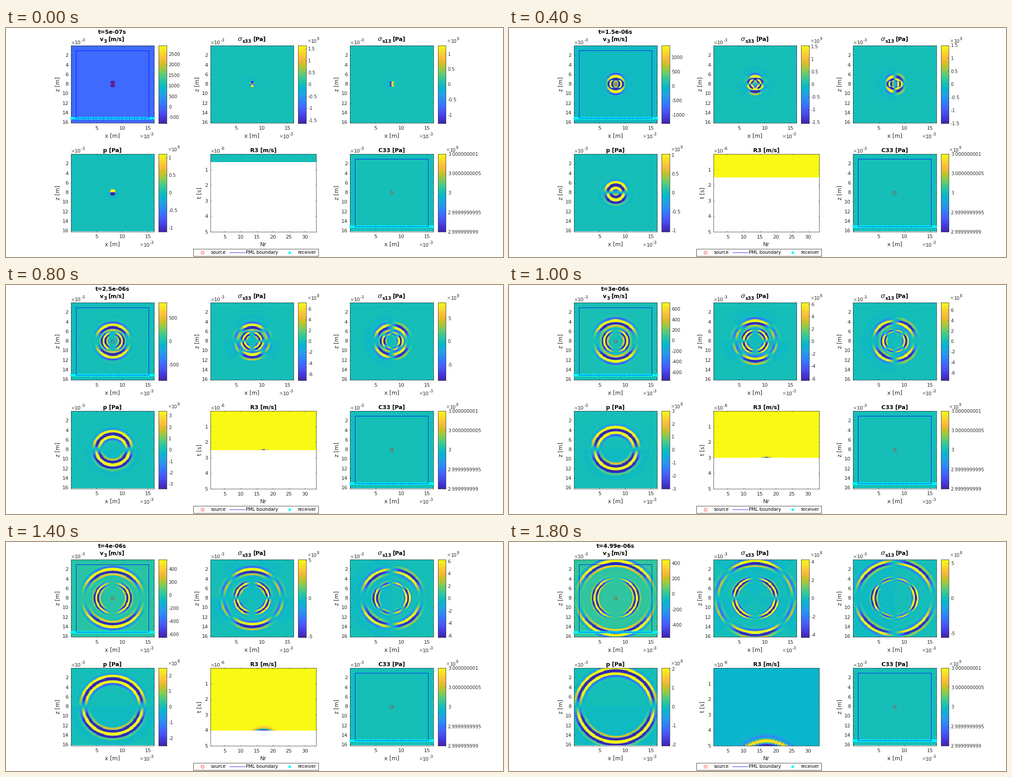
A matplotlib script that plays this animation: 1101x509 px, repeating every 2 s.

```python
import numpy as np
import matplotlib.pyplot as plt
from matplotlib.animation import FuncAnimation
from matplotlib.colors import LinearSegmentedColormap
from matplotlib.patches import Rectangle

W, H, PT = 1101, 509, 0.72            # stage in pixels, points per pixel
TICK, LABEL, SMALL = 11.1, 12.35, 10.1
GREY = "#262626"
SIZE, MID = 16.2, 8.1                 # model width and centre, mm

plt.rcParams["font.family"] = "DejaVu Sans"
parula = LinearSegmentedColormap.from_list("parula", list(zip(
    np.append(np.arange(0, 61, 4), 63) / 63, [
        (.2422, .1504, .6603), (.2706, .2147, .8364), (.2813, .3006, .9414),
        (.2699, .3892, .9906), (.1963, .4847, .9892), (.1687, .5703, .9359),
        (.1248, .6459, .8883), (.0297, .7082, .8163), (.0964, .7500, .7120),
        (.2161, .7843, .5923), (.3909, .8029, .4354), (.6174, .7876, .2612),
        (.8203, .7498, .1535), (.9728, .7298, .2394), (.9892, .8136, .1885),
        (.9597, .9135, .1423), (.9769, .9839, .0805)])), N=256)

TIMES = [.5, 1, 1.5, 2, 2.5, 3, 3.5, 4, 4.5, 4.99]     # microseconds
V_LOW = [-790, -1740, -1290, -937, -832, -755, -695, -645, -603, -563]
V_HIGH = [2915, 1820, 1410, 1028, 832, 725, 619, 550, 495, 447]
PEAK = {                                               # in 1e8 Pa
    "s33": [16.4, 28.1, 15.5, 8.6, 7.18, 6.3, 5.6, 5.1, 4.6, 4.28],
    "s13": [12.85, 22, 15, 10.2, 8.4, 7.5, 6.78, 6.3, 5.9, 5.55],
    "p": [11.1, 23.6, 10.3, 4.04, 3.42, 3.005, 2.7, 2.49, 2.29, 2.07],
}

fig = plt.figure(figsize=(W / 100, H / 100), dpi=100, facecolor="white")


def text(x, y, s, size=LABEL, ha="left", color="black", **kw):
    """Text with its capitals centred on pixel row y."""
    return fig.text(x / W, 1 - (y + .365 * size) / H, s, fontsize=size * PT,
                    ha=ha, va="baseline", color=color, **kw)


def bold(x, y, s, size=LABEL, ha="left"):
    return text(x, y, s, size, ha, weight="bold")


def power(x, y, exp, size=TICK):
    """Axis multiplier; returns the exponent so it can change."""
    text(x, y, "×", size, color="0.4")
    text(x + .838 * size, y, "10", size, color=GREY)
    return text(x + 2.11 * size, y - .47 * size, str(exp), .8 * size, color=GREY)


def make_axes(x0, y0, x1, y1):
    ax = fig.add_axes([x0 / W, 1 - y1 / H, (x1 - x0) / W, (y1 - y0) / H])
    for side in ax.spines.values():
        side.set(linewidth=.55, color=GREY)
    ax.tick_params(direction="in", length=1.4, width=.5, color=GREY,
                   labelcolor=GREY, labelsize=TICK * PT, top=True, right=True)
    ax.tick_params(axis="x", pad=5)
    ax.tick_params(axis="y", pad=3.6)
    return ax


def label_axes(x0, y0, x1, y1, xlabel, ylabel, ygap, exp):
    mid = (x0 + x1) / 2
    text(mid, y1 + 27.5, xlabel, ha="center", color=GREY)
    fig.text((x0 - ygap) / W, 1 - (y0 + y1) / 2 / H, ylabel, rotation=90,
             fontsize=LABEL * PT, ha="center", va="center", color=GREY)
    power(x0 - .5, y0 - 7, exp)


def map_panel(x0, y0):
    x1, y1 = x0 + 184.5, y0 + 172.5
    ax = make_axes(x0, y0, x1, y1)
    im = ax.imshow(np.zeros((162, 162)), cmap=parula, vmin=-1, vmax=1,
                   extent=(0, SIZE, SIZE, 0), aspect="auto",
                   interpolation="nearest")
    ax.set_xticks([5, 10, 15])
    ax.set_yticks(range(2, 17, 2))
    label_axes(x0, y0, x1, y1, "x [m]", "z [m]", 29, -3)
    power(x1 - 32.5, y1 + 29, -3)
    return ax, im


def color_bar(x0, y0):
    ax = make_axes(x0, y0 - .5, x0 + 17.5, y0 + 173)
    ax.set_xticks([])
    im = ax.imshow(np.linspace(0, 1, 256)[:, None], cmap=parula, origin="lower",
                   extent=(0, 1, 0, 1), aspect="auto")
    ax.yaxis.tick_right()
    ax.tick_params(axis="y", labelsize=SMALL * PT, pad=3.4)
    return ax, im


def scale_bar(bar, low, high, step):
    ax, im = bar
    im.set_extent((0, 1, low, high))
    n = np.arange(int(np.ceil(low / step)), int(np.floor(high / step)) + 1)
    ax.set_yticks(n * step, [f"{v:g}" for v in n * step])
    ax.set_ylim(low, high)


def geometry(ax):
    ax.plot(np.linspace(.1, 16.1, 33), np.full(33, 15.1), "o", color="cyan",
            ms=6 * PT, mew=0, clip_on=False, zorder=3)
    ax.add_patch(Rectangle((1, 1), 14.15, 14.1, fill=False, ec="blue", lw=.6,
                           zorder=4))
    ax.plot(MID, MID, "o", mfc="none", mec="red", ms=6.6 * PT, mew=.55, zorder=5)
    ax.set_xlim(0, SIZE)
    ax.set_ylim(SIZE, 0)


# Panels
TOP, LOW = 39, 280
COLS = [143.5, 452.5, 762]
PLACE = {"v3": (COLS[0], TOP), "s33": (COLS[1], TOP),
         "s13": (COLS[2], TOP), "p": (COLS[0], LOW)}
images, bars, exps = {}, {}, {}
for key, (px, py) in PLACE.items():
    panel, images[key] = map_panel(px, py)
    bars[key] = color_bar(px + 194.5, py)
    if key == "v3":
        geometry(panel)
    else:
        exps[key] = power(px + 215, py - 10, 9, SMALL)

stiff, _ = map_panel(COLS[2], LOW)
geometry(stiff)
stiff_bar = color_bar(COLS[2] + 194.5, LOW)
scale_bar(stiff_bar, -2, 2, 1)
stiff_bar[0].set_yticks(range(-2, 3), [
    "2.999999999", "2.9999999995", "3", "3.0000000005", "3.000000001"])
power(COLS[2] + 213, LOW - 9, 9, SMALL)

REC = (COLS[1], LOW, 687, LOW + 173)
rec = make_axes(*REC)
rec_im = rec.imshow(np.zeros((500, 33)), cmap=parula, vmin=0, vmax=1,
                    extent=(.5, 33.5, 5, 0), aspect="auto",
                    interpolation="nearest")
rec.set_xticks(range(5, 31, 5))
rec.set_yticks(range(1, 6))
label_axes(*REC, "Nr", "t [s]", 23.5, -6)

# Titles
clock = bold(235.5, 8.5, "", ha="center")
bold(208, 24, "v")
bold(216, 29.5, "3", 10.3)
bold(227, 24, "[m/s]")
for left, sub in ((514, "s33"), (823.5, "s13")):
    text(left, 24, "σ", 13.5, family="DejaVu Serif", style="italic")
    bold(left + 9.5, 29.5, sub, 10.3)
    bold(left + 33.5, 24, "[Pa]")
bold(235.8, 271, "p [Pa]", ha="center")
bold(569.8, 271, "R3 [m/s]", ha="center")
bold(854.5, 271, "C33 [Pa]", ha="center")

# Legend
over = fig.add_axes([0, 0, 1, 1])
over.set(xlim=(0, W), ylim=(H, 0))
over.axis("off")
over.add_patch(Rectangle((414.5, 490.5), 277.5, 16, fc="white", ec=GREY, lw=.6))
over.plot(435, 498.5, "o", mfc="none", mec="red", ms=6.6 * PT, mew=.55)
over.plot([494.5, 528.5], [498.5, 498.5], color="blue", lw=.6)
over.plot(627.5, 498.5, "o", color="cyan", ms=6 * PT, mew=0)
for left, word in ((453, "source"), (531, "PML boundary"), (646.5, "receiver")):
    text(left, 498.5, word, SMALL)

# Wave fields around the centre
cells = (np.arange(162) + .5) * SIZE / 162 - MID
X, Z = np.meshgrid(cells, cells)
R = np.hypot(X, Z)
UP, SIDE = -Z / R, X / R
COS2 = 2 * UP**2 - 1
P_SHAPE = {"v3": 3 * UP**2, "s33": 2.6 * UP * COS2,
           "s13": -5 * UP**2 * SIDE, "p": 5 * UP}
S_SHAPE = {"v3": 4 * SIDE**2, "s33": 10 * SIDE**2 * UP,
           "s13": 3.5 * SIDE * COS2, "p": 0}


def p_wave(s):
    return np.sin(2 * np.pi * s / 1.15) * np.exp(-(s / .7)**2)


def pressure_wave(s):
    return -np.cos(2 * np.pi * s / 1.2) * np.exp(-((s + .1) / .75)**2)


def s_wave(s):
    return np.cos(2 * np.pi * s / .74) * np.exp(-((s + .08) / .5)**2)


def field(key, t):
    if t < .75:
        blob = np.exp(-(R / .52)**4)
        f = P_SHAPE[key] * (blob if key == "p" else -blob)
        reach = abs(X) + abs(Z)
    else:
        if key == "p":
            wave = pressure_wave(R - (1.68 * t - .96))
        else:
            wave = p_wave(R - (1.75 * t - 1.28))
        s_radius = np.interp(t, [1, 2, 5], [.77, 1.33, 4.12])
        f = P_SHAPE[key] * wave + S_SHAPE[key] * s_wave(R - s_radius)
        reach = R
    if key != "v3":                    # faint fan running ahead
        lobe = -UP if key == "p" else P_SHAPE[key]
        f = f - .04 * ((lobe > 0) & (reach < .65 + 1.96 * t))
    return f


def record(t):
    rows = (np.arange(500)[:, None] + .5) / 100
    off = np.arange(33)[None, :] - 16
    if t < 1.2:
        v = np.full((500, 33), .5)
    elif t < 4.9:
        width = np.interp(t, [2, 2.5, 3.5, 4.5], [.5, .7, 1.4, 3.2])
        tau = np.interp(t, [2, 2.5, 3.5, 4.5], [.02, .025, .04, .13])
        gain = 1.2 if t >= 2 else 0
        v = 1 - gain * np.exp(-(off / width)**2 - (t - rows) / tau)
    else:
        dist = np.hypot(7.05, off * .5)
        v = .453 + .62 * (7.05 / dist)**2 * p_wave(
            dist - (1.75 * (rows - .07) - 1.28))
    return np.where(rows <= t + .005, v, np.nan)


def tick_step(m):
    if m < 2:
        return .5
    if m < 4:
        return 1
    return 5 if 5 <= m < 6 or m >= 8 else 2


def update(i):
    t = TIMES[i]
    clock.set_text(f"t={t * 1e-6:.3g}s")
    low, high = V_LOW[i], V_HIGH[i]
    images["v3"].set_data(field("v3", t) * (high - low) / 2)
    images["v3"].set_clim(low, high)
    scale_bar(bars["v3"], low, high, 500 if t < 3 else 200)
    for key, peaks in PEAK.items():
        images[key].set_data(field(key, t))
        big = peaks[i] >= 10
        m = peaks[i] / 10 if big else peaks[i]
        exps[key].set_text("9" if big else "8")
        scale_bar(bars[key], -m, m, tick_step(m))
    rec_im.set_data(record(t))
    return []


anim = FuncAnimation(fig, update, frames=len(TIMES), init_func=lambda: update(0),
                     interval=200, repeat=True, repeat_delay=0, blit=False)
plt.show()
```
